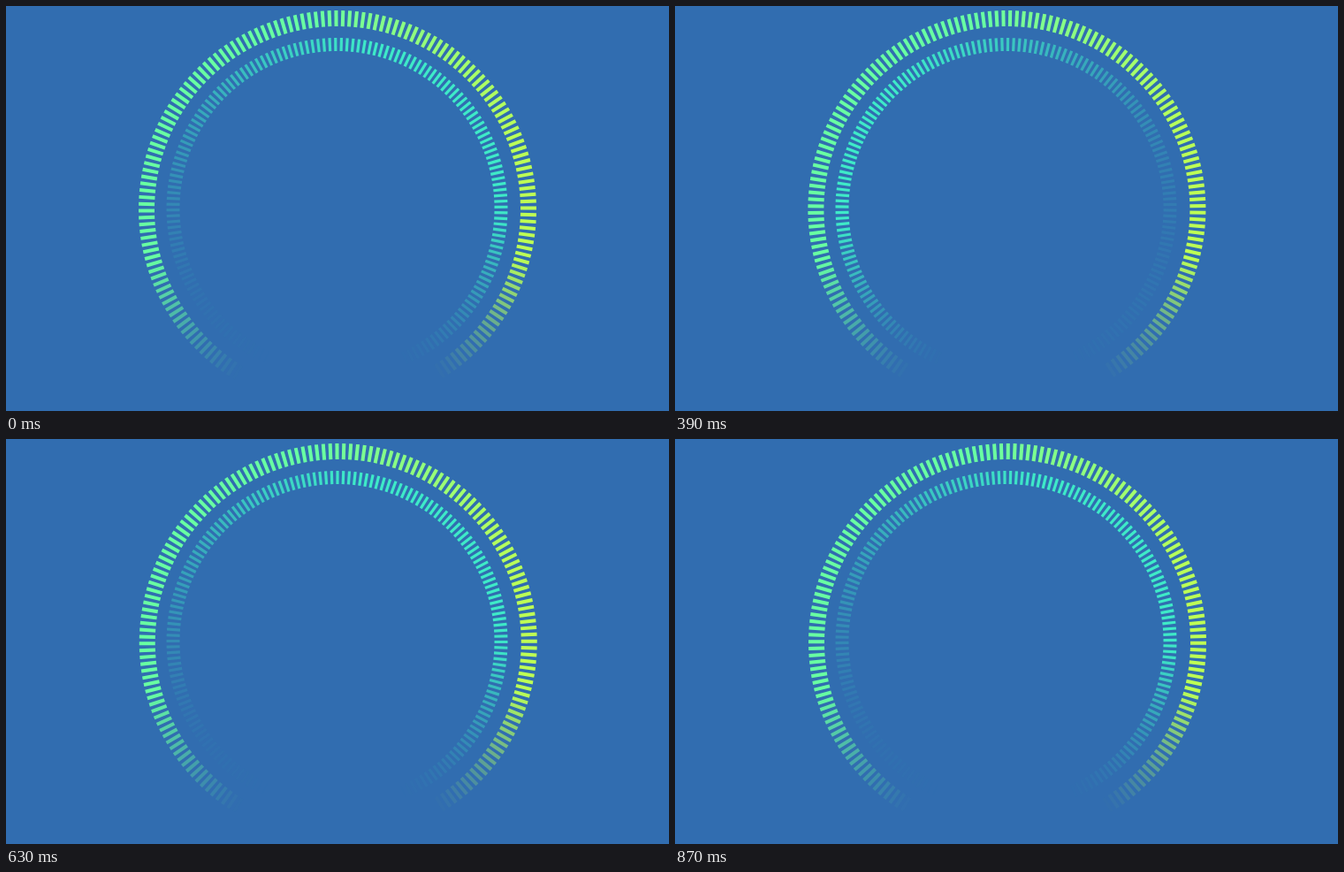
An HTML page with a canvas for the animation above (0.9 s loop, 750 by 458 pixels).

```html
<!DOCTYPE html>
<html lang="en">
<head>
<meta charset="utf-8">
<title>Dashed rings</title>
<style>
  html, body { margin: 0; width: 100%; height: 100%; overflow: hidden; background: #316db0; }
  canvas { display: block; }
</style>
</head>
<body>
<canvas id="stage" width="750" height="458"></canvas>
<script>
const ctx = document.getElementById('stage').getContext('2d');
const LOOP = 900, STEP = 30, COUNT = 180, RAD = Math.PI / 180;

// [time in ms, value]
const TURN = [[0, -.4], [150, -.53], [390, -1.03], [510, -1.6], [630, -2.33], [750, -3.08], [870, -3.8]];
const DRIFT = [[0, 375], [150, 375.05], [390, 375.4], [510, 375.5], [630, 375.75], [750, 376], [870, 376]];
const SWING = [[0, 50], [150, -51.78], [270, -74], [390, -74.86], [510, -25.81],
               [630, 44.68], [750, 47.44], [870, 50.06]];

const clamp = v => Math.max(0, Math.min(1, v));
const mix = (a, b, k) => a + (b - a) * k;

// Monotone cubic through the keys, flat at both ends
function sample(keys, t) {
  const last = keys.length - 1;
  if (t >= keys[last][0]) return keys[last][1];
  const slope = i => (keys[i + 1][1] - keys[i][1]) / (keys[i + 1][0] - keys[i][0]);
  const tangent = i => {
    if (i === 0 || i === last) return 0;
    const a = slope(i - 1), b = slope(i);
    return a * b > 0 ? 2 * a * b / (a + b) : 0;
  };
  let i = 0;
  while (t >= keys[i + 1][0]) i++;
  const [t0, v0] = keys[i], [t1, v1] = keys[i + 1];
  const h = t1 - t0, u = (t - t0) / h, w = 1 - u;
  return v0 * (1 + 2 * u) * w * w + v1 * u * u * (3 - 2 * u)
       + h * u * w * (tangent(i) * w - tangent(i + 1) * u);
}

// Angles are in degrees, clockwise from the top
function ring(cx, cy, radius, size, width, offset, paint) {
  ctx.lineWidth = width;
  for (let i = 0; i < COUNT; i++) {
    const deg = i * 360 / COUNT + offset;
    const sx = Math.sin(deg * RAD), sy = -Math.cos(deg * RAD);
    const [rgb, alpha] = paint(cx + radius * sx, cy + radius * sy, deg);
    if (alpha <= 0) continue;
    const r0 = radius - size / 2, r1 = radius + size / 2;
    ctx.strokeStyle = `rgba(${rgb},${alpha})`;
    ctx.beginPath();
    ctx.moveTo(cx + r0 * sx, cy + r0 * sy);
    ctx.lineTo(cx + r1 * sx, cy + r1 * sy);
    ctx.stroke();
  }
}

function outerPaint(x, y) {
  const k = clamp((x - 350) / 240);
  const rgb = [mix(104, 190, k), 255, mix(162, 84, k)].map(Math.round);
  const fade = y < 350 ? mix(1, .5, clamp((y - 285) / 65)) : .5 * clamp((415 - y) / 65);
  return [rgb, fade];
}

function draw(t) {
  ctx.fillStyle = '#316db0';
  ctx.fillRect(0, 0, 750, 458);
  ring(sample(DRIFT, t), 230, 216, 18, 4, sample(TURN, t), outerPaint);

  const swing = sample(SWING, t);
  ring(374.5, 229, 185.5, 15, 3.2, swing - .525, (x, y, deg) => {
    const light = clamp(.6 + .5 * Math.cos((deg - swing) * RAD));
    return ['62,234,200', light * clamp((400 - y) / 155)];
  });
}

const start = performance.now();
function tick() {
  const t = (performance.now() - start) % LOOP;
  draw(Math.floor(t / STEP) * STEP);
  requestAnimationFrame(tick);
}
tick();
</script>
</body>
</html>
```
